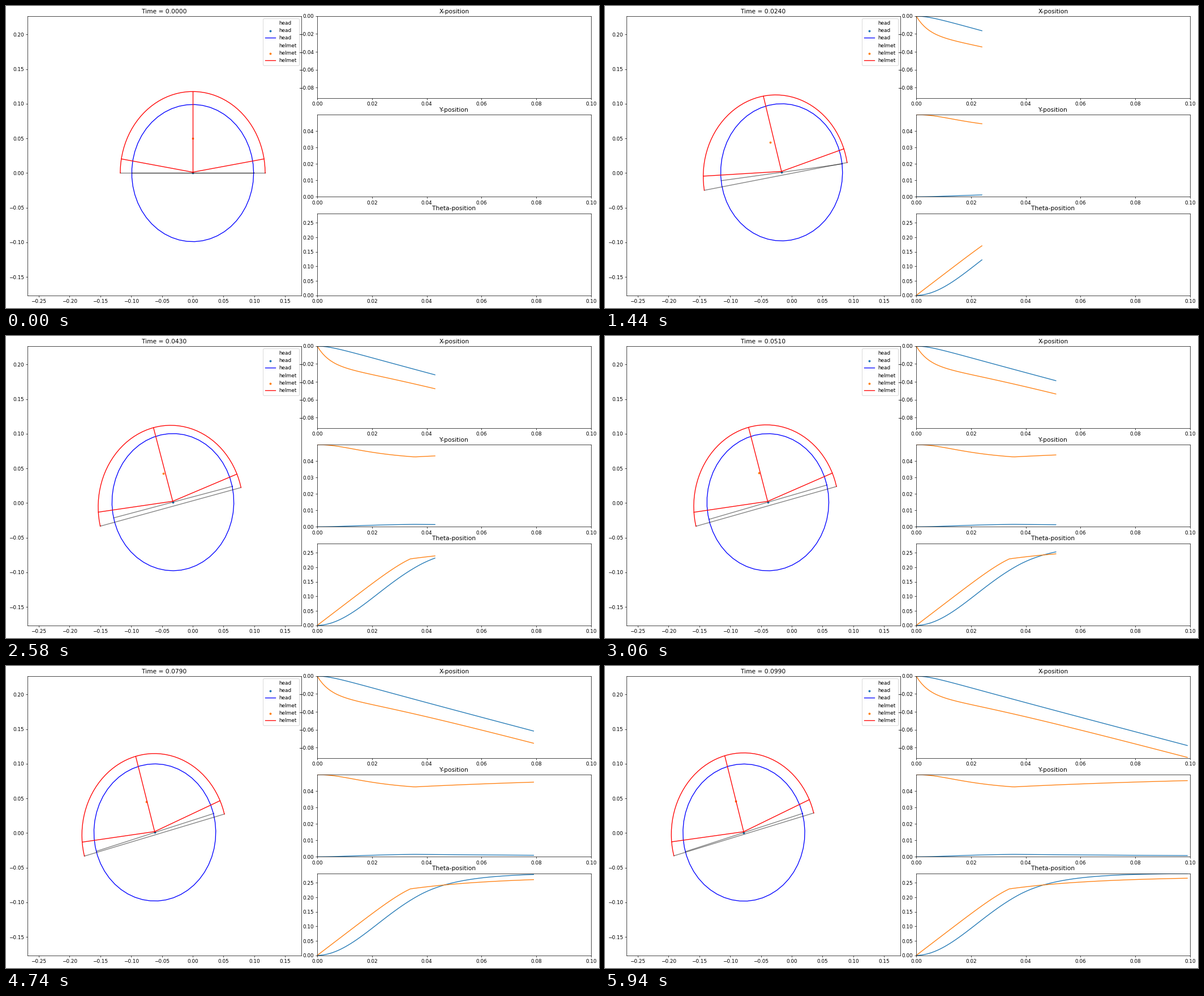
Recreate the animation shown at these times as a matplotlib script. Size 1048 px wide and 534 px high, loop 6 s.

```python
import numpy as np
import matplotlib.pyplot as plt
from matplotlib.animation import FuncAnimation

W, H, DPI = 1048, 534, 64
FRAMES, INTERVAL, DT = 100, 60, 0.001
R_HEAD, R_HELMET = 0.099, 0.1177      # radii
COM = 0.05                            # helmet centre of mass above its rim
MASS_RATIO, V0 = 5.1, 4.92            # head / helmet mass, impact speed
HUB = 0.0013                          # spring joint above the head centre
RELEASE = 0.034                       # end of the contact phase

T = np.arange(FRAMES) * DT


def decay(t, tau):
    return np.exp(-t / tau)


# Sideways: the common centre of mass drifts, the gap opens fast and settles
drift = -V0 * T / (MASS_RATIO + 1)
gap = 0.013 * (1 + decay(T, 0.0265)) - 0.026 * decay(T, 0.0046)
helmet_x = drift - gap * MASS_RATIO / (MASS_RATIO + 1)
head_x = drift + gap / (MASS_RATIO + 1)

# Upright: the helmet sinks during contact, then recovers slowly
sink = np.minimum(0.0105 * T**2 / (T**2 + 0.0225**2),
                  0.0075 * decay(T - 0.0355, 0.089))
helmet_y = COM - sink
head_y = sink / MASS_RATIO

# Head turn: the power-law exponent continues along its tangent after the bend
POWER, BEND = 1.923, 0.037
bent = np.minimum(T, BEND)
growth = (bent / 0.03225) ** POWER * (1 + POWER * (T - bent) / BEND)
head_a = 0.283 * (1 - np.exp(-growth))

# Helmet turn: nearly constant rate, breaking sharply at release
helmet_a = np.where(T < RELEASE,
                    7.2 * T - 0.0158 * (T / RELEASE) ** 6,
                    0.2715 - 0.0425 * decay(T - RELEASE, 0.0325))


def place(x, y, a, cx, cy):
    """Rotate local points by a, then move them to (cx, cy)."""
    x, y = np.asarray(x, float), np.asarray(y, float)
    return (x * np.cos(a) - y * np.sin(a) + cx,
            x * np.sin(a) + y * np.cos(a) + cy)


fig = plt.figure(figsize=(W / DPI, H / DPI), dpi=DPI)


def panel(left, top, height, title, xlim, ylim):
    ax = fig.add_axes([left / W, 1 - (top + height) / H, 484 / W, height / H])
    ax.set(xlim=xlim, ylim=ylim)
    return ax, ax.set_title(title)


TOP, PITCH, ROW = 17.9, 174.4, 145
pad = 1.5 * R_HELMET
scene, clock = panel(38, TOP, 2 * PITCH + ROW, "Time = 0.0000",
                     (-0.0918 - pad, pad), (-pad, COM + pad))


def body(name, color):
    chord, = scene.plot([], [], "k,-", alpha=0.5)
    blank, = scene.plot([], [], ls="", label=name)
    dot = scene.scatter([0], [0], s=45, marker=".", label=name)
    outline, = scene.plot([], [], color=color, label=name)
    return chord, dot, outline, [blank, dot, outline]


head_chord, head_dot, head_line, head_keys = body("head", "blue")
helm_chord, helm_dot, helm_line, helm_keys = body("helmet", "red")
springs = [scene.plot([], [], color="red")[0] for _ in range(3)]
scene.legend(handles=head_keys + helm_keys, loc="upper right",
             labelspacing=0.48)

curves = []
for row, (name, ylim, pair) in enumerate([
        ("X-position", (-0.0918, 0), (head_x, helmet_x)),
        ("Y-position", (0, 0.0499), (head_y, helmet_y)),
        ("Theta-position", (0, 0.2824), (head_a, helmet_a))]):
    ax, _ = panel(550, TOP + PITCH * row, ROW, name, (0, 0.1), ylim)
    curves += [(ax.plot([], [])[0], data) for data in pair]

circle = np.linspace(0, 2 * np.pi, 50)
arc = np.linspace(0, np.pi, 50)
anchors = np.radians([10, 90, 170])


def draw(i):
    clock.set_text(f"Time = {T[i]:.4f}")

    pose = head_a[i], head_x[i], head_y[i]
    head_dot.set_offsets([pose[1:]])
    head_chord.set_data(*place([-R_HEAD, R_HEAD], [0, 0], *pose))
    head_line.set_data(*place(R_HEAD * np.cos(circle),
                              R_HEAD * np.sin(circle), *pose))
    hub_x, hub_y = place(0, HUB, *pose)

    pose = helmet_a[i], helmet_x[i], helmet_y[i]
    helm_dot.set_offsets([pose[1:]])
    helm_chord.set_data(*place([-R_HELMET, R_HELMET], [-COM, -COM], *pose))
    helm_line.set_data(*place(R_HELMET * np.cos(arc),
                              R_HELMET * np.sin(arc) - COM, *pose))
    ends = place(R_HELMET * np.cos(anchors),
                 R_HELMET * np.sin(anchors) - COM, *pose)
    for spring, x, y in zip(springs, *ends):
        spring.set_data([hub_x, x], [hub_y, y])

    for line, data in curves:
        line.set_data(T[:i + 1], data[:i + 1])
    return []


anim = FuncAnimation(fig, draw, frames=FRAMES, interval=INTERVAL,
                     repeat=True, repeat_delay=0, blit=False)
plt.show()
```
